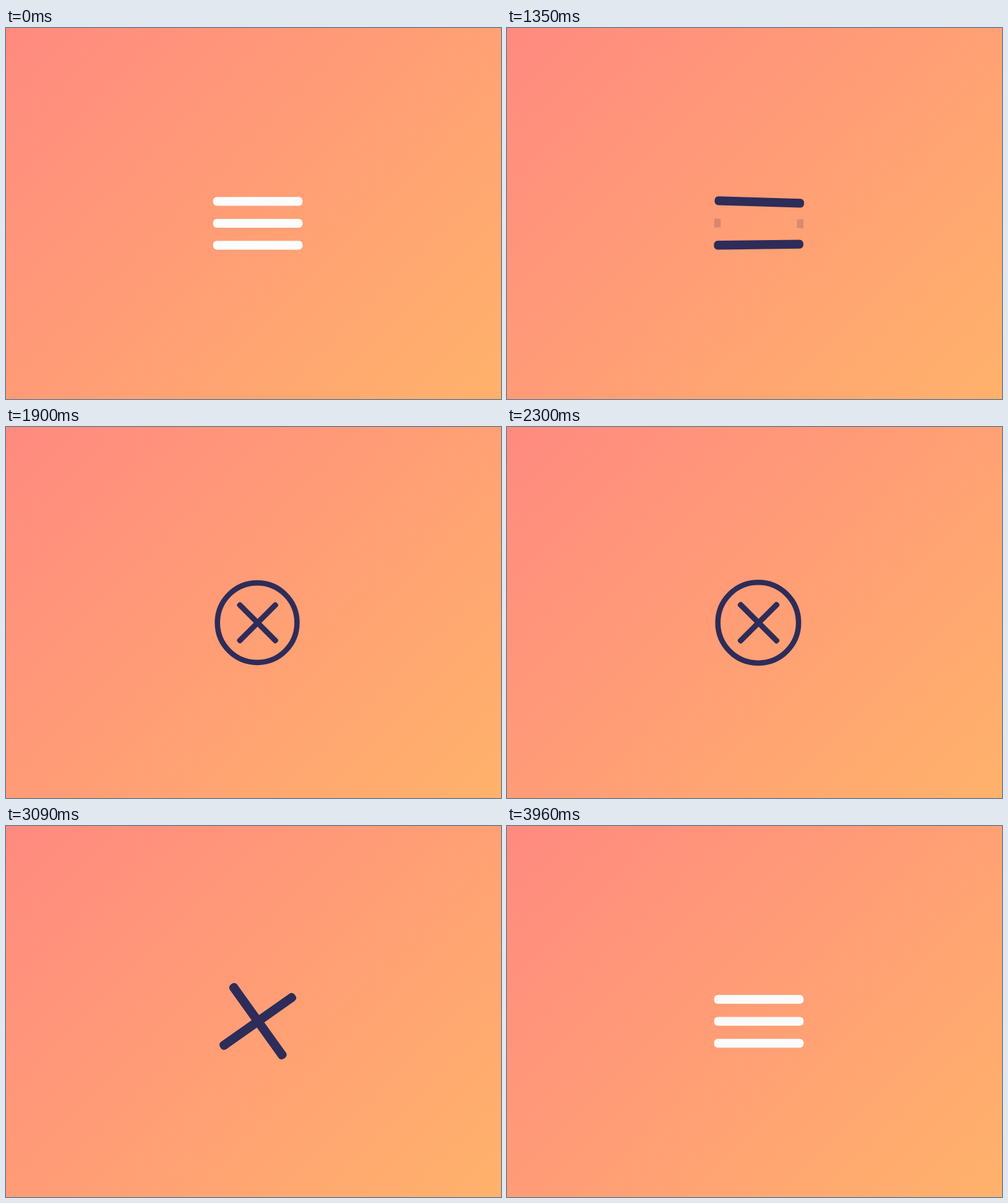
An HTML page with a canvas that plays this animation: 800 px wide and 600 px high, repeating every 5.23 s.

```html
<!DOCTYPE html>
<html lang="en">
<head>
<meta charset="utf-8">
<title>Menu icon</title>
<style>
  html, body { margin: 0; width: 100%; height: 100%; overflow: hidden; }
  canvas { display: block; width: 800px; height: 600px; }
</style>
</head>
<body>
<canvas id="stage" width="800" height="600"></canvas>
<script>
const ctx = document.getElementById('stage').getContext('2d');
const LOOP = 5230;
const BAR = { w: 144.6, h: 14.3, r: 6, gap: 35.5 };
const WHITE = [253, 253, 254], NAVY = [46, 44, 88];

const mix = (a, b, k) => a + (b - a) * k;
const span = (t, from, to) => Math.min(1, Math.max(0, (t - from) / (to - from)));
const smooth = k => k * k * (3 - 2 * k);
const rad = deg => deg * Math.PI / 180;

function expoInOut(k) {
  if (k <= 0 || k >= 1) return k <= 0 ? 0 : 1;
  return k < 0.5 ? 2 ** (20 * k - 10) / 2 : 1 - 2 ** (10 - 20 * k) / 2;
}

// cubic-bezier(.25, .1, .25, 1)
function ease(x) {
  if (x <= 0 || x >= 1) return x <= 0 ? 0 : 1;
  const curve = (a, b, u) => 3 * a * u * (1 - u) ** 2 + 3 * b * u * u * (1 - u) + u ** 3;
  let lo = 0, hi = 1;
  for (let i = 0; i < 24; i++) {
    const u = (lo + hi) / 2;
    if (curve(0.25, 0.25, u) < x) lo = u; else hi = u;
  }
  return curve(0.1, 1, lo);
}

const sky = ctx.createLinearGradient(50, -50, 750, 650);
sky.addColorStop(0, '#ff8a80');
sky.addColorStop(1, '#ffb26b');

function bar(x, y, tilt, alpha = 1) {
  if (alpha <= 0) return;
  ctx.save();
  ctx.globalAlpha = alpha;
  ctx.translate(x, y);
  ctx.rotate(rad(tilt));
  ctx.beginPath();
  ctx.roundRect(-BAR.w / 2, -BAR.h / 2, BAR.w, BAR.h, BAR.r);
  ctx.fill();
  ctx.restore();
}

// Damped wobble of the closed icon
function wobble(t) {
  if (t < 1450 || t > 2770) return 1;
  const k = t - 1600;
  return 1 - 0.03 * smooth(span(t, 1450, 1600)) * Math.exp(-k / 300) * Math.cos(k * Math.PI / 150);
}

function ring(t, turn) {
  const fade = smooth(span(t, 2770, 3050));
  const alpha = t < 1350
    ? 0.18 * span(t, 1250, 1350)
    : mix(0.18, 1, span(t, 1350, 1500)) * (1 - fade);
  if (alpha <= 0) return;
  const grown = smooth(span(t, 1350, 1600));
  const half = mix(0.105, Math.PI / 2, smooth(span(t, 1350, 1640)));
  const width = mix(10.4, 8.6, grown);
  const outer = (mix(72.2, 69.4, grown) + 3 * fade) * wobble(t);
  ctx.save();
  ctx.globalAlpha = alpha;
  ctx.translate(mix(407, 406, grown), mix(316, 316.5, grown));
  ctx.rotate(rad(turn));
  ctx.lineWidth = width;
  ctx.beginPath();
  for (const mid of [0, Math.PI]) {
    const r = outer - width / 2;
    ctx.moveTo(r * Math.cos(mid - half), r * Math.sin(mid - half));
    ctx.arc(0, 0, r, mid - half, mid + half);
  }
  ctx.stroke();
  ctx.restore();
}

function draw(t) {
  ctx.fillStyle = sky;
  ctx.fillRect(0, 0, 800, 600);

  const dark = ease(span(t, 690, 890)) * (1 - ease(span(Math.min(t, 3960), 3830, 3980)));
  const rgb = WHITE.map((v, i) => Math.round(mix(v, NAVY[i], dark)));
  ctx.fillStyle = ctx.strokeStyle = `rgb(${rgb})`;

  const cross = expoInOut(span(t, 1150, 1840)) * (1 - expoInOut(span(t, 3030, 3390)));
  const turn = 90 * expoInOut(span(t, 1230, 1900)) * (1 - expoInOut(span(t, 2770, 3295)));
  const shrink = smooth(span(t, 1350, 1620)) * (1 - smooth(span(t, 2770, 3020)));
  const bounce = 0.02 * smooth(span(t, 2950, 3080)) * Math.exp(-Math.max(0, t - 3090) / 110);
  const scale = mix(1, 0.625, shrink) * wobble(t) + bounce;
  const middle = 1 - smooth(span(t, 1140, 1320)) + smooth(span(t, 3120, 3300));

  ring(t, turn);

  ctx.save();
  ctx.translate(407 - 0.4 * shrink, 315.9 + 0.7 * shrink);
  ctx.rotate(rad(turn));
  ctx.scale(scale, scale);
  const gap = BAR.gap * (1 - cross);
  bar(20 * cross * (1 - cross), -gap, 45 * cross);
  bar(0, 0, 0, middle);
  bar(0, gap, -45 * cross);
  ctx.restore();
}

const start = performance.now();
function tick() {
  draw((performance.now() - start) % LOOP);
  requestAnimationFrame(tick);
}
tick();
</script>
</body>
</html>
```
